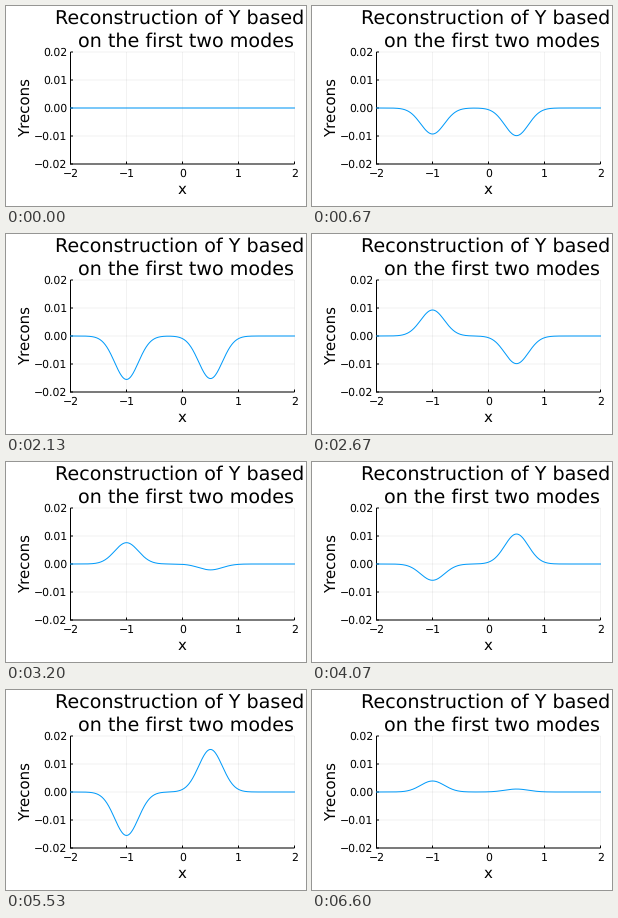
These frames come from a looping animation (300 by 200 pixels, 6670 ms). A matplotlib script:

```python
import numpy as np
import matplotlib.pyplot as plt
from matplotlib.animation import FuncAnimation
from matplotlib.collections import LineCollection

W, H, DPI = 300, 200, 100
LOOP_MS, TICK_MS, STEPS = 6670, 10, 100
TICKS = LOOP_MS // TICK_MS
LEFT, RIGHT, TOP, BOTTOM = 64.5, 288.5, 46, 158
PT = 72 / DPI  # points per pixel

plt.rcParams.update({"font.family": "DejaVu Sans", "text.hinting": "no_hinting"})

# Axes coordinates are stage pixels, measured from the top left.
fig = plt.figure(figsize=(W / DPI, H / DPI), dpi=DPI, facecolor="white")
ax = fig.add_axes([0, 0, 1, 1])
ax.set(xlim=(0, W), ylim=(H, 0))
ax.axis("off")


def to_x(v):
    return LEFT + (v + 2) * (RIGHT - LEFT) / 4


def to_y(v):
    return BOTTOM - (v + 0.02) * (BOTTOM - TOP) / 0.04


def label(x, y, text, size, **kw):
    kw = {"ha": "center", "va": "baseline", **kw}
    ax.text(x, y, text.replace("-", "\u2212"), fontsize=size * PT, **kw)


def rules(segments, width, **kw):
    lines = LineCollection(segments, linewidths=width * PT, colors="black", **kw)
    lines.set_snap(False)
    ax.add_collection(lines)


grid = []
frame = [[(LEFT, TOP), (LEFT, BOTTOM + 0.5)], [(LEFT, BOTTOM), (RIGHT, BOTTOM)]]
for v in range(-2, 3):
    px, py = to_x(v), to_y(v / 100)
    grid += [[(px, TOP), (px, BOTTOM)], [(LEFT, py), (RIGHT, py)]]
    frame += [[(px, BOTTOM), (px, BOTTOM - 2.5)], [(LEFT, py), (LEFT + 2.5, py)]]
    label(px, 171, str(v), 10.85)
    label(61, py + 4, f"{v / 100:.2f}", 10.85, ha="right")
rules(grid, 0.5, alpha=0.1)
rules(frame, 1)

mid = (LEFT + RIGHT) / 2
label(mid - 3, 18, "Reconstruction of Y based", 19.2)
label(mid + 3, 40.5, "on the first two modes", 19.2)
label(mid, 188, "x", 15)
label(25, (TOP + BOTTOM) / 2, "Yrecons", 15, rotation=90, rotation_mode="anchor")

x = np.linspace(-2, 2, 401)


def bump(center, sigma):
    return np.exp(-((x - center) / sigma) ** 2 / 2)


fast = 0.0158 * bump(-1, 0.212)
slow = 0.0168 * bump(0.5, 0.212)
curve, = ax.plot(to_x(x), to_y(0 * x), color="#009AFA", lw=PT, snap=False, zorder=3)


def draw(tick):
    # The curve holds each of its steps until the nearest clock tick.
    step = int((tick + 0.5) * STEPS / TICKS)
    phase = 2 * np.pi * step / STEPS
    curve.set_ydata(to_y(-fast * np.sin(4 * phase) - slow * np.sin(phase)))
    return curve,


anim = FuncAnimation(fig, draw, frames=TICKS, interval=TICK_MS,
                     repeat=True, repeat_delay=0, blit=False)
plt.show()
```
